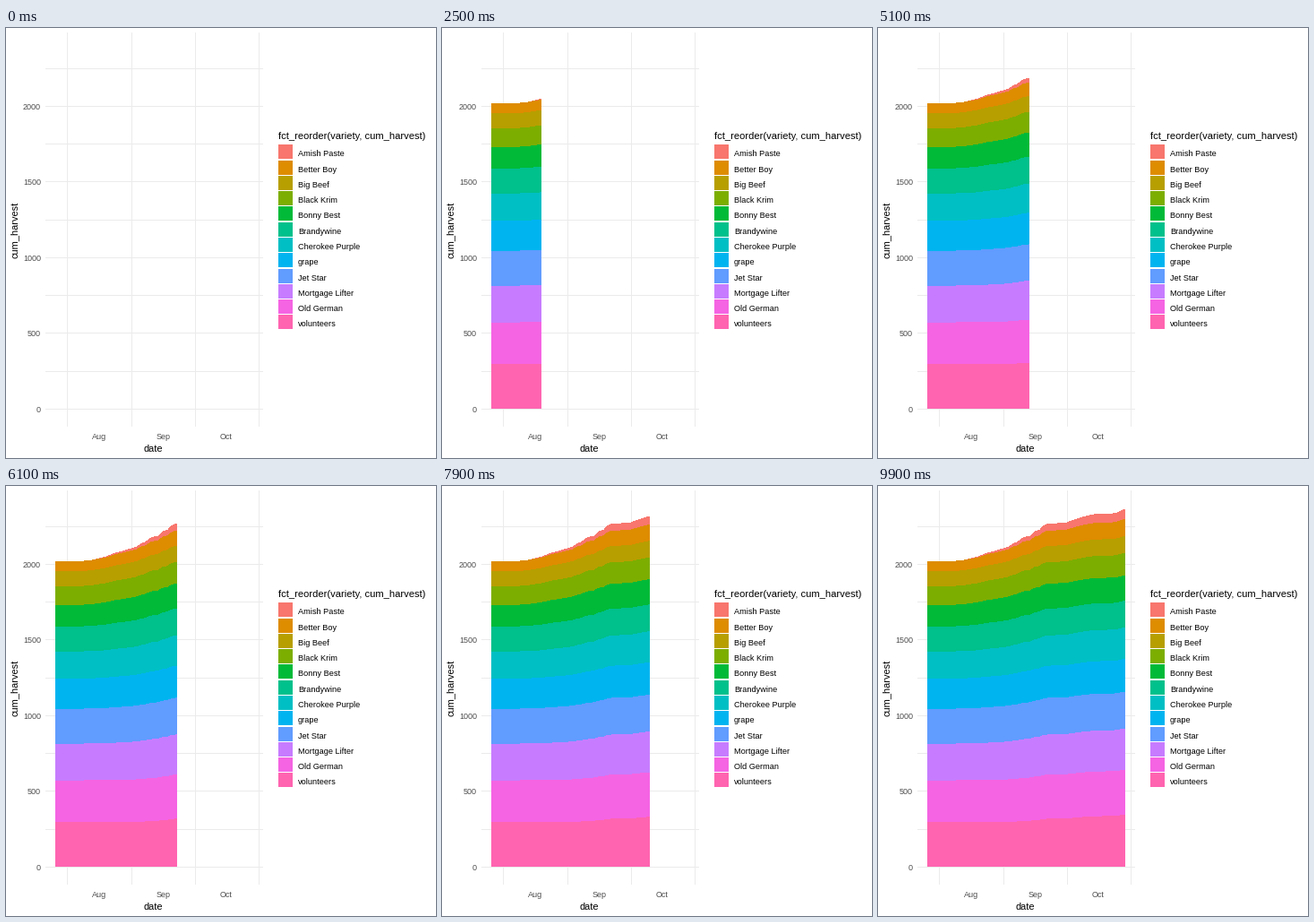
A matplotlib script for the animation above (10 s loop, 480 by 480 pixels).

```python
import numpy as np
import matplotlib.pyplot as plt
from matplotlib.animation import FuncAnimation
from matplotlib.patches import Polygon, Rectangle

SIZE, DPI, FRAMES = 480, 100, 100
LEFT, RIGHT, BASE = 55, 275.6, 425

# name, colour, upper edge at the start (px), total rise (px), lag exponent
BANDS = [
    ("Amish Paste", "#F8766D", 84, 58, 1.0),
    ("Better Boy", "#DE8C00", 84, 47, 1.0),
    ("Big Beef", "#B79F00", 95.3, 39, 1.0),
    ("Black Krim", "#7CAE00", 112, 37, 1.0),
    ("Bonny Best", "#00BA38", 133, 33, 1.0),
    ("Brandywine", "#00C08B", 157, 28.5, 1.1),
    ("Cherokee Purple", "#00BFC4", 185, 27, 1.25),
    ("grape", "#00B4F0", 215.3, 22, 1.3),
    ("Jet Star", "#619CFF", 249, 19, 1.35),
    ("Mortgage Lifter", "#C77CFF", 288, 17, 1.55),
    ("Old German", "#F564E3", 329, 12, 1.9),
    ("volunteers", "#FF64B0", 375.7, 8.5, 2.4),
]

# Growth of the whole stack: x and rise in px
KNOT_X = np.array([55, 87, 96, 104, 111, 122, 130, 140, 146, 152, 155, 158,
                   162, 165, 170, 173, 175, 181, 183, 188, 191, 200, 211,
                   222, 232, 241, 250, 262, 267, 276])
RISE = np.array([0, 0, 1, 3, 4.5, 9, 11, 14, 16, 20, 20.5, 23,
                 26, 27, 28, 31, 33, 35, 38, 41, 41.5, 42, 43,
                 47, 50, 52, 52.5, 53, 54, 58])

plt.rcParams["font.family"] = "Liberation Sans"
fig = plt.figure(figsize=(SIZE / DPI, SIZE / DPI), dpi=DPI, facecolor="white")
ax = fig.add_axes([0, 0, 1, 1])
ax.set(xlim=(0, SIZE), ylim=(SIZE, 0))
ax.axis("off")


def label(x, y, s, px=9, color="black", **kw):
    ax.text(x, y, s, fontsize=px * 72 / DPI, color=color, **kw)


def box(x, y, w, h, color, z):
    ax.add_patch(Rectangle((x, y), w, h, fc=color, lw=0, zorder=z,
                           antialiased=False))


def draw_axes():
    grid, grey = "#EBEBEB", "#4D4D4D"
    for x in (68, 140, 211, 282):
        box(x, 5, 1, 440, grid, 0)
    for i in range(10):
        y = int(425.4 - 42.25 * i)
        box(44, y, 243, 1, grid, 0)
        if i % 2 == 0:
            label(39, y + 4, str(250 * i), color=grey, ha="right",
                  va="baseline")
    for x, month in ((104, "Aug"), (176, "Sep"), (245.5, "Oct")):
        label(x, 459, month, color=grey, ha="center", va="baseline")
    label(164.5, 473, "date", 11, ha="center", va="baseline")
    label(15, 225.5, "cum_harvest", 11, rotation=90, ha="right",
          va="center", rotation_mode="default")


def draw_legend():
    label(304.5, 124, "fct_reorder(variety, cum_harvest)", 11.1,
          va="baseline")
    for i, (name, color, *_) in enumerate(BANDS):
        y = round(130.2 + 17.3 * i)
        box(304, y, 16, 16, color, 1)
        label(326, y + 13, name, 9.15, va="baseline")


draw_axes()
draw_legend()

# Each area reaches the baseline; later bands cover the earlier ones
areas = []
for i, (_, color, *_) in enumerate(BANDS):
    area = Polygon([(LEFT, BASE)] * 3, fc=color, lw=0, antialiased=False,
                   zorder=2 + i)
    areas.append(ax.add_patch(area))


def update(k):
    edge = LEFT + (RIGHT - LEFT) * k / (FRAMES - 1)
    xs = np.append(KNOT_X[KNOT_X < edge], edge)
    growth = np.interp(xs, KNOT_X, RISE) / RISE[-1]
    for area, (_, _, top, rise, lag) in zip(areas, BANDS):
        ys = top - rise * growth ** lag
        area.set_xy(np.column_stack([np.r_[LEFT, xs, edge],
                                     np.r_[BASE, ys, BASE]]))
        area.set_visible(k > 0)
    return areas


anim = FuncAnimation(fig, update, frames=FRAMES, interval=100, repeat=True,
                     repeat_delay=0, blit=False)
plt.show()
```
